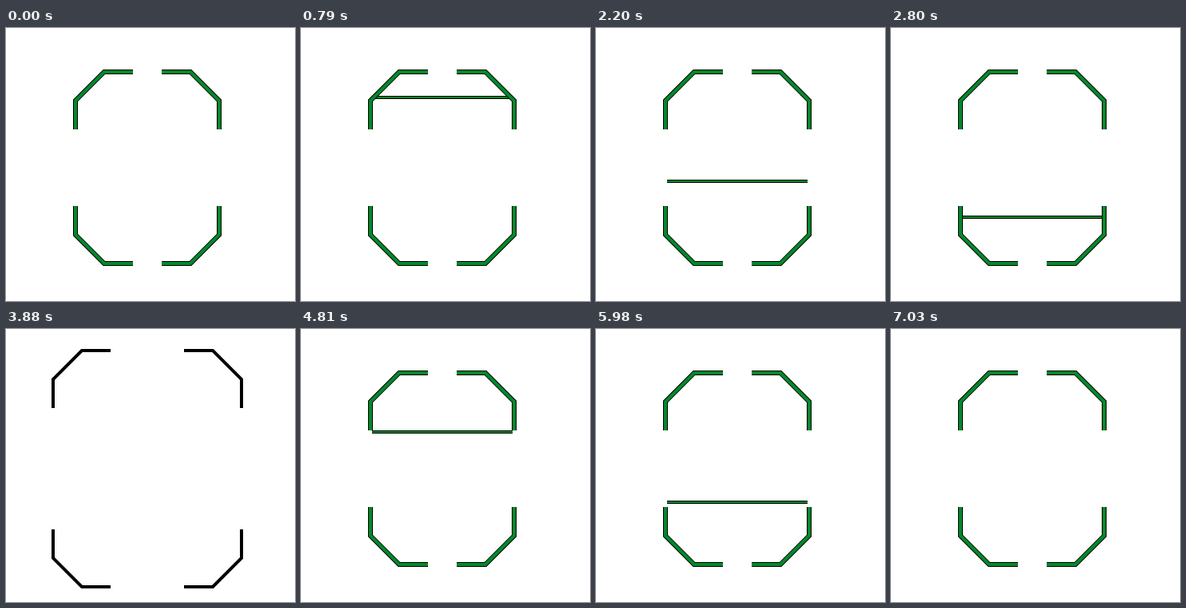
These frames come from a looping animation (362 px wide and 342 px high, 7.06 s). An HTML page:

```html
<!DOCTYPE html>
<html>
<head>
<meta charset="utf-8">
<title>Scanning frame</title>
<style>
html, body { margin: 0; width: 100%; height: 100%; overflow: hidden; background: #fff; }
svg { display: block; width: 362px; height: 342px; }
path { fill: none; stroke-linejoin: miter; }
.edge { stroke: #000; }
.core { stroke: #00892b; }
</style>
</head>
<body>
<svg viewBox="0 0 362 342">
  <g id="beam">
    <path class="edge" stroke-width="4"/>
    <path class="core" stroke-width="2"/>
  </g>
  <g id="corners" transform="translate(177 175)"></g>
</svg>
<script>
const LOOP = 7060, CYCLE = 3450, STEP = 30;
const ARM = 'M-18-120H-54L-90-84V-48';
const SIDES = [[1, 1], [-1, 1], [1, -1], [-1, -1]];
const corners = document.getElementById('corners');
const beam = document.getElementById('beam');

corners.innerHTML = SIDES.map(([x, y]) =>
  `<g transform="scale(${x} ${y})"><g class="arm">` +
  `<path class="edge" d="${ARM}"/><path class="core" d="${ARM}"/></g></g>`).join('');
const arms = [...corners.querySelectorAll('.arm')];

function setCorners(shift, edge, core) {
  for (const arm of arms) {
    arm.setAttribute('transform', `translate(${-shift} ${-shift})`);
    arm.children[0].setAttribute('stroke-width', edge);
    arm.children[1].setAttribute('stroke-width', core);
  }
}

function setBeam(y) {
  // The beam narrows along the slanted corners.
  const inset = Math.max(0, 91 - y, y - 259);
  for (const p of beam.children) p.setAttribute('d', `M${89 + inset} ${y}H${265 - inset}`);
}

function draw(time) {
  const t = time < 100 ? 0 : Math.floor((time - 10) / STEP) * STEP + 10;
  const second = t >= 3610;
  const phase = second ? t - CYCLE : t;
  const out = t >= 100 && phase < 460;

  if (!out) setCorners(0, 6, 4);
  else if (phase >= 430) setCorners(28, 4, 0);
  else setCorners(28, second ? 6 : 7, 4);

  const scanning = phase >= 460 && phase < 3580;
  beam.style.display = scanning ? '' : 'none';
  if (scanning) setBeam(Math.round(149.5 + (phase - 1630) * 0.075));
}

const start = performance.now();
function tick() {
  draw((performance.now() - start) % LOOP);
  requestAnimationFrame(tick);
}
tick();
</script>
</body>
</html>
```
